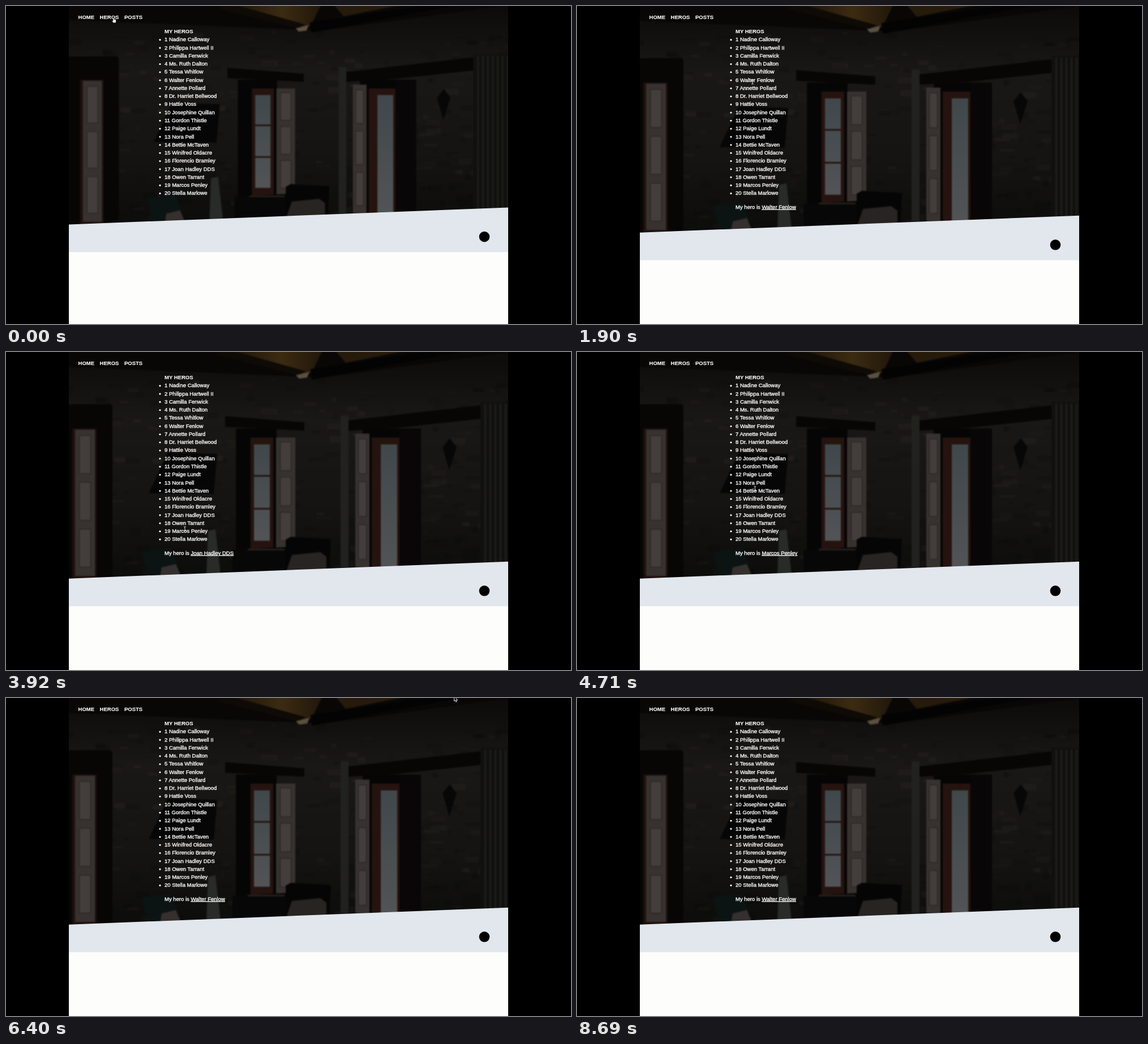
Write an HTML page that moves like this. It is 998 px wide and 561 px high and loops after 8730 ms.

```html
<!DOCTYPE html>
<html lang="en">
<head>
<meta charset="utf-8">
<title>My heros</title>
<style>
html, body { margin: 0; width: 100%; height: 100%; overflow: hidden; background: #000; }
svg { display: block; width: 998px; height: 561px; }
text { font: 9.5px "Liberation Sans", Arial, sans-serif; fill: #fff; stroke: #fff; stroke-width: .35px; }
.bold { font-weight: bold; stroke-width: .1px; }
</style>
</head>
<body>
<svg viewBox="0 0 998 561">
  <defs>
    <clipPath id="page"><rect x="111" width="776" height="561"/></clipPath>
    <filter id="soft" x="0" y="0" width="1" height="1" color-interpolation-filters="sRGB">
      <feGaussianBlur stdDeviation="1.2"/>
    </filter>
    <linearGradient id="wall" x2="0" y2="1">
      <stop offset="0" stop-color="#0b0a09"/>
      <stop offset=".3" stop-color="#1a1816"/>
      <stop offset=".65" stop-color="#151413"/>
      <stop offset="1" stop-color="#0b0b0a"/>
    </linearGradient>
    <linearGradient id="wood" x2="1" y2="0">
      <stop offset="0" stop-color="#120c05"/>
      <stop offset=".6" stop-color="#3c2b12"/>
      <stop offset="1" stop-color="#20160a"/>
    </linearGradient>
    <linearGradient id="glass" x2="0" y2="1">
      <stop offset="0" stop-color="#40484b"/>
      <stop offset="1" stop-color="#525456"/>
    </linearGradient>
  </defs>
  <g clip-path="url(#page)">
    <g id="room" filter="url(#soft)"></g>
    <g id="footer">
      <path d="M111 399.7 887 369.7V580H111Z" fill="#e2e7ed"/>
      <path d="M111 448.5H887V600H111Z" fill="#fdfdfc"/>
      <circle cx="845" cy="421.3" r="9.3"/>
    </g>
  </g>
  <g id="copy"></g>
  <text id="choice" x="280" y="357.7">My hero is <tspan id="hero" text-decoration="underline"></tspan></text>
  <g id="cursor" stroke-linejoin="round">
    <path id="hand" d="M-1.8-4.5q1.1-.9 1.8.3l.4 2.6q2-.5 3.3.9.9 2.4-.5 5.5h-4.3q-.6-1.7-2.4-3.4.3-1.5 2 0Z" fill="#fff" stroke="#111" stroke-width=".7"/>
    <path id="beam" d="M-1.8-4Q0-4 0-2.8 0-4 1.8-4M0-3V3M-1.8 4Q0 4 0 2.8 0 4 1.8 4" fill="none" stroke="#eee" stroke-width=".9"/>
    <path id="arrow" d="M-.5-5V3.6L1.5 1.9 2.8 4.9 4.2 4.3 3 1.5H5.6Z" fill="#080808" stroke="#eee" stroke-width=".9"/>
  </g>
</svg>
<script>
const LOOP = 8730, ROW = 14.26;
const $ = id => document.getElementById(id);

const heroes = [
  'Nadine Calloway', 'Philippa Hartwell II', 'Camilla Fenwick', 'Ms. Ruth Dalton', 'Tessa Whitlow',
  'Walter Fenlow', 'Annette Pollard', 'Dr. Harriet Bellwood', 'Hattie Voss', 'Josephine Quillan',
  'Gordon Thistle', 'Paige Lundt', 'Nora Pell', 'Bettie McTaven', 'Winifred Oldacre',
  'Florencio Bramley', 'Joan Hadley DDS', 'Owen Tarrant', 'Marcos Penley', 'Stella Marlowe'
];

// Each move eases the pointer to a point; a pick is clicked just after arrival
const moves = [
  { from: 1000, to: 1700, x: 310, y: 134, pick: 6 },
  { from: 2150, to: 2750, x: 312, y: 239, pick: 14 },
  { from: 3150, to: 3600, x: 315, y: 288, pick: 17 },
  { from: 3780, to: 3950, x: 316, y: 314, pick: 19 },
  { from: 4450, to: 5050, x: 312, y: 132, pick: 6 },
  { from: 5350, to: 5860, x: 486, y: 89 },
  { from: 5860, to: 6400, x: 792, y: 2 },
  { from: 6400, to: 6520, x: 840, y: -20 }
];

let seed = 7;
const random = () => (seed = seed * 16807 % 2147483647) / 2147483647;

function paintRoom() {
  let out = '';
  const box = (x, y, w, h, fill, more = '') =>
    out += `<rect x="${x}" y="${y}" width="${w}" height="${h}" fill="${fill}" ${more}/>`;
  const shape = (d, fill) => out += `<path d="${d}" fill="${fill}"/>`;
  const shutter = (x, y, w, h) => {
    box(x, y, w, h, '#37322f');
    for (let i = 0; i < 3; i++)
      box(x + w * .22, y + h * (.04 + i * .32), w * .56, h * .26, '#433e3b', 'stroke="#241f1c"');
  };
  // Glazed opening in a red-brown frame with a dark recess
  const opening = (x, y, w, h, rim) => {
    box(x - 32, y - 28, w + 44, h + 50, '#060505');
    box(x - rim, y - 12, w + rim * 2, h + 26, '#25130f');
    box(x, y, w, h, 'url(#glass)');
  };

  box(80, -10, 840, 430, 'url(#wall)');
  for (let i = 0; i < 300; i++)
    box(90 + random() * 810, 45 + random() * 350, 9 + random() * 22, 4 + random() * 8,
      random() < .4 ? '#4a4036' : '#000', `rx="3" opacity="${.04 + random() * .11}"`);

  // Ceiling and beams
  shape('M80-10H920V-4L560 45 440 40 80 25Z', '#090706');
  shape('M375-5H560L540 36 520 42Z', 'url(#wood)');
  shape('M390-5 530 34 515 41 370 5Z', '#0e0a05');
  shape('M512 41 536 35 532 45 518 47Z', '#5a503f');
  shape('M580-5H720L600 19Z', '#261a0b');
  shape('M538 30 790-8H845L540 49Z', '#030303');

  // Left window, screen, middle window, right door
  box(80, 92, 108, 308, '#070605', 'rx="5"');
  box(117, 135, 43, 265, '#1e110d');
  shutter(122, 137, 35, 258);
  shape('M286 177 373 180 367 250 252 249Z', '#060606');
  opening(438, 163, 28, 170, 6);
  for (const y of [217, 275]) box(437, y, 30, 3, '#22140f');
  shutter(477, 151, 34, 194);
  shape('M387 113 527 124V139L387 132Z', '#080605');
  opening(662, 163, 29, 220, 16);
  box(695, 135, 38, 250, '#080606');
  shutter(617, 144, 25, 236);
  shape('M602 121 838 94V118L690 134 602 139Z', '#070605');

  // Curtains and wall lamp
  box(591, 112, 14, 268, '#21211e');
  box(838, 88, 80, 300, '#10100e');
  for (let x = 845; x < 915; x += 9) box(x, 91, 3, 300, '#1f1e1a');
  shape('M771 168 784 152 796 168 783 209Z', '#070707');

  // Furniture and plant
  shape('M400 349 495 344V395H400Z', '#070707');
  box(427, 347, 65, 3, '#241f1b');
  shape('M240 352 292 345 312 402H252Z', '#0b1313');
  shape('M275 380 300 374 310 398H272Z', '#35302d');
  shape('M357 315 370 313 379 392H354Z', '#282b27');
  shape('M494 331 503 326 574 330 571 390H494Z', '#050505');
  shape('M505 358 555 353 566 361V390H494Z', '#272422');
  $('room').innerHTML = out;
}

function writeCopy() {
  const line = (x, y, words, style = '') => `<text x="${x}" y="${y}" class="${style}">${words}</text>`;
  let out = line(127.6, 22.7, 'HOME', 'bold') + line(165.6, 22.7, 'HEROS', 'bold') +
    line(209, 22.7, 'POSTS', 'bold') + line(280, 48.1, 'MY HEROS', 'bold');
  heroes.forEach((name, i) => {
    const y = 62.4 + i * ROW;
    out += `<circle cx="272" cy="${y - 2.7}" r="1.6" fill="#fff"/>` + line(280, y, `${i + 1} ${name}`);
  });
  $('copy').innerHTML = out;
}

function pointer(t) {
  let x = 190.5, y = 25;
  for (const m of moves) {
    const u = Math.min(1, Math.max(0, (t - m.from) / (m.to - m.from)));
    const k = u * u * (3 - 2 * u);
    x += (m.x - x) * k;
    y += (m.y - y) * k;
  }
  return [x, y];
}

function draw() {
  const t = performance.now() % LOOP;
  const click = moves.filter(m => m.pick && m.to + 120 <= t).pop();
  $('choice').style.display = click ? '' : 'none';
  if (click) $('hero').textContent = heroes[click.pick - 1];
  // The section grows when the choice line appears
  $('footer').setAttribute('transform', `translate(0 ${click ? 0 : -ROW})`);
  $('room').setAttribute('transform', click ? '' : 'translate(499 0) scale(.9635) translate(-499 0)');

  const [x, y] = pointer(t);
  const kind = y < 29 && x < 242 ? 'hand' : x > 280 && x < 365 && y > 52 && y < 338 ? 'beam' : 'arrow';
  for (const id of ['hand', 'beam', 'arrow']) $(id).style.display = id === kind ? '' : 'none';
  $('cursor').setAttribute('transform', `translate(${x} ${y})`);
  requestAnimationFrame(draw);
}

paintRoom();
writeCopy();
draw();
</script>
</body>
</html>
```
